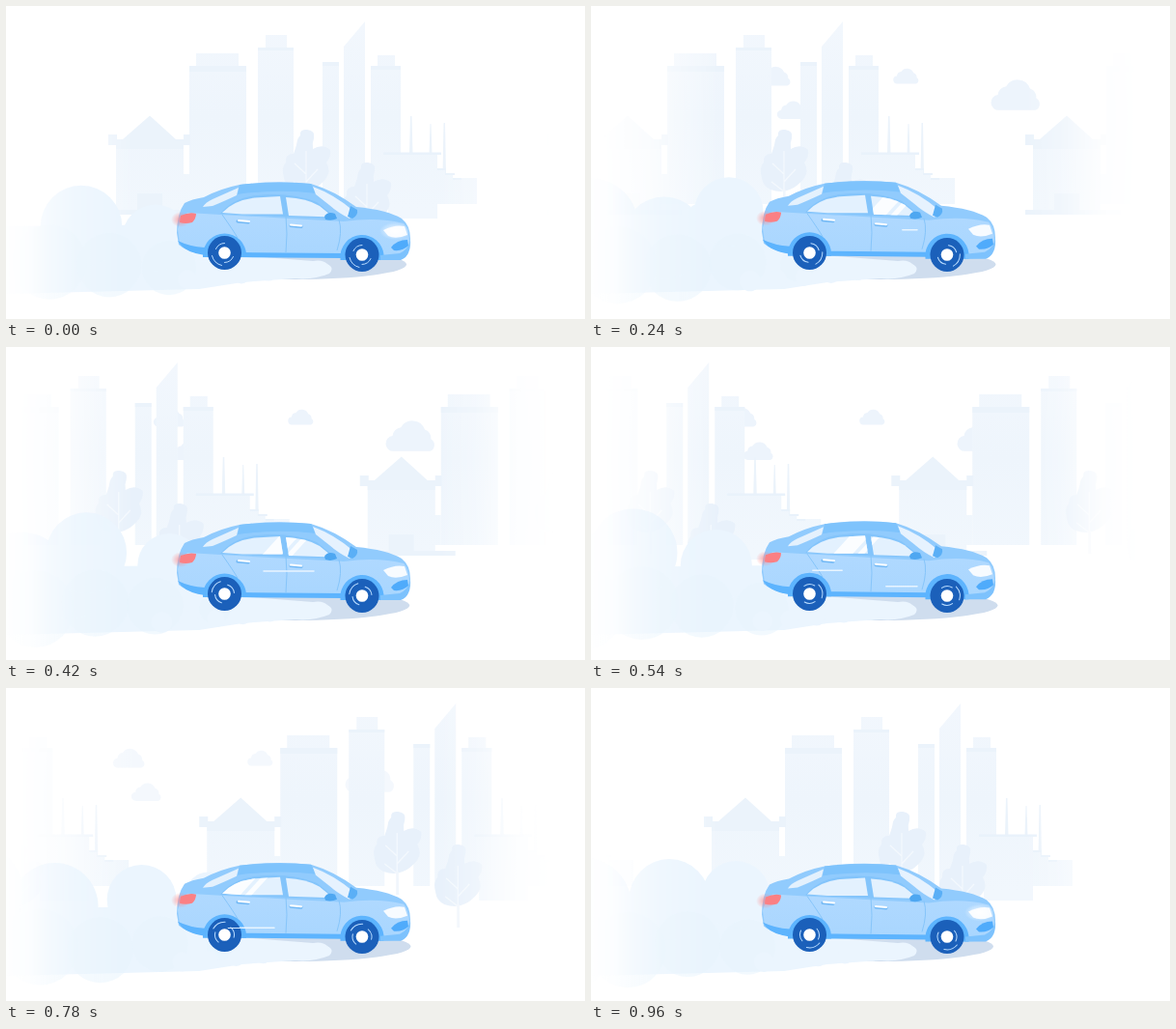
Write an HTML page that moves like this. It is 600 px wide and 324 px high and loops after 1020 ms.

```html
<!DOCTYPE html>
<html lang="en">
<head>
<meta charset="utf-8">
<title>City drive</title>
<style>
  html, body { margin: 0; width: 100%; height: 100%; overflow: hidden; background: #fff; }
  svg { display: block; width: 100vw; height: 100vh; }
</style>
</head>
<body>
<svg viewBox="0 0 600 324">
  <defs>
    <linearGradient id="sides" gradientUnits="userSpaceOnUse" x1="0" x2="600" y1="0" y2="0">
      <stop offset=".02" stop-color="#000"/>
      <stop offset=".1" stop-color="#444"/>
      <stop offset=".15" stop-color="#999"/>
      <stop offset=".22" stop-color="#fff"/>
      <stop offset=".75" stop-color="#fff"/>
      <stop offset=".81" stop-color="#bbb"/>
      <stop offset=".85" stop-color="#666"/>
      <stop offset=".885" stop-color="#222"/>
      <stop offset=".95" stop-color="#000"/>
    </linearGradient>
    <linearGradient id="left" gradientUnits="userSpaceOnUse" x1="0" x2="600" y1="0" y2="0">
      <stop offset="0" stop-color="#080808"/>
      <stop offset=".04" stop-color="#282828"/>
      <stop offset=".07" stop-color="#777"/>
      <stop offset=".12" stop-color="#ccc"/>
      <stop offset=".2" stop-color="#fff"/>
    </linearGradient>
    <mask id="fade" maskUnits="userSpaceOnUse" x="0" y="0" width="600" height="324">
      <rect width="600" height="324" fill="url(#sides)"/>
    </mask>
    <mask id="haze" maskUnits="userSpaceOnUse" x="0" y="0" width="600" height="324">
      <rect width="600" height="324" fill="url(#left)"/>
    </mask>
    <linearGradient id="wall" gradientUnits="userSpaceOnUse" x1="0" x2="0" y1="20" y2="210">
      <stop offset="0" stop-color="#f2f7fd"/>
      <stop offset=".5" stop-color="#eef5fc"/>
      <stop offset="1" stop-color="#f1f7fd"/>
    </linearGradient>
    <radialGradient id="red">
      <stop offset="0" stop-color="#ff8585" stop-opacity=".75"/>
      <stop offset="1" stop-color="#ff8585" stop-opacity="0"/>
    </radialGradient>
    <radialGradient id="white">
      <stop offset="0" stop-color="#fff"/>
      <stop offset="1" stop-color="#fff" stop-opacity="0"/>
    </radialGradient>
    <linearGradient id="paint" x1="0" x2="0" y1="0" y2="1">
      <stop offset="0" stop-color="#b0d9ff"/>
      <stop offset="1" stop-color="#a9d6fe"/>
    </linearGradient>
    <clipPath id="glass">
      <path d="M224 213Q236 200 258 197.500L284 196L287 214.500L245 214.500Z"/>
      <path d="M290 197Q312 198 325 206L339 217.500L293 216Z"/>
    </clipPath>

    <path id="puffy" d="M-17 15a7 7 0 0 1-1-14a9 9 0 0 1 8-8a13 13 0 0 1 23 2a9 9 0 0 1 6 9a6 6 0 0 1-1 11z"/>

    <g id="tree" fill="#e8f1fb">
      <path d="M-10 8Q-9 0-6-2Q-7-9 1-8Q10-7 8 1Q6 6 7 12Q17 6 25 13Q26 20 21 26Q26 35 21 42Q14 51 6 54Q-3 58-14 54Q-22 50-23 42Q-26 31-21 26Q-22 17-13 17Z"/>
      <path d="M0 14V56M0 46l12-13M0 38l-12-11M0 56l-13-10" fill="none" stroke="#f4f9fe" stroke-width="1.200"/>
      <path d="M-1 54h2.500l.5 24h-3z" fill="#f1f6fc"/>
    </g>

    <g id="city" fill="url(#wall)">
      <path d="M190 174h-7v31h7z"/>
      <path d="M197 49h44v14h-44zM190 62h59v143h-59z"/>
      <path d="M269 30h22v14h-22zM261 43h37v162h-37z"/>
      <path d="M328 58h17v147h-17zM350 42L372 16V205H350Z"/>
      <path d="M385 51h18v12h-18zM378 62h31v143h-31z"/>
      <g fill="#ebf3fb">
        <path d="M190 62h59v6h-59zM261 43h37v3h-37zM328 58h17v4h-17zM378 62h31v4h-31z"/>
        <path d="M419 114h1.500l1 39h-3.500zM439.500 122h1l1 31h-3zM453.500 121h1.500l1 54h-3.500z"/>
        <path d="M121 138L149 113.500L176 138Z"/>
        <path d="M106 133h9v5h69v-5h7v11H106z"/>
      </g>
      <path d="M396 153h51v15h8v5h8v5h25v27h-41v15h-51z"/>
      <path d="M391 151.500h60v2.500h-60zM447 168h9v2h-9zM455 173h10v2h-10zM463 178h9v2h-9z" fill="#e9f2fb"/>
      <path d="M114 144h70v69h-70z"/>
      <path d="M114 144h70v4h-70zM136 194h26v18h-26zM106 211h99v5h-99z" fill="#ebf3fb"/>
      <use href="#tree" x="311" y="136"/>
      <use href="#tree" x="374" y="170"/>
    </g>

    <g id="wheel">
      <circle r="17.500" fill="#1b60ba"/>
      <g class="spin" fill="none" stroke="#b9dcff" stroke-width="1" stroke-linecap="round">
        <path d="M-9-4A10 10 0 0 1 0-10M9 4A10 10 0 0 1 0 10M-3 13A13.500 13.500 0 0 1-13 3"/>
      </g>
      <circle r="8" fill="#1b60ba"/>
      <circle r="6.300" fill="#fff"/>
    </g>
  </defs>

  <g mask="url(#fade)">
    <g id="clouds" fill="#edf4fc">
      <use href="#puffy" transform="translate(469 91) scale(1.08 1.12)"/>
      <use href="#puffy" transform="translate(355 72) scale(.56)"/>
      <use href="#puffy" transform="translate(219 72) scale(.7)"/>
      <use href="#puffy" transform="translate(237 107) scale(.66)"/>
    </g>
    <g id="scroll">
      <use href="#city"/>
      <use href="#city" x="455"/>
    </g>
  </g>

  <ellipse id="shadow" cx="300" cy="267.500" ry="15.500" fill="#cfddee"/>

  <g mask="url(#haze)">
    <path d="M0 228L200 226L215 256L318 264Q328 262 333 267Q341 271 335 277Q318 284 300 282L245 286L200 293L0 298Z" fill="#ebf5fe"/>
    <g id="smoke"></g>
  </g>

  <g id="car">
    <path d="M177 234Q177 214 185 203Q192 199 205 197Q222 188 242 184Q280 179 316 183Q340 190 363 207Q395 210 410 219Q419 226 419 240Q419 257 409 261L386 262L345 259L205 256Q185 252 179 246Z" fill="#91cbfd"/>
    <path d="M178 230Q181 218 188 213Q240 216 293 219L350 222Q385 217 412 224Q418 230 418 246Q414 257 405 259L345 257L205 253Q187 250 180 244Z" fill="url(#paint)"/>
    <path d="M242 184Q280 180 316 183L322 193Q280 188 240 194Z" fill="#7ec3fc"/>
    <path d="M204 207Q207 202 214 199L241 187L239 195Q224 202 214 206Z" fill="#e4f1fd"/>
    <path d="M318 186Q340 194 360 211L356 219Q344 213 335 205L321 194Z" fill="#e6f2fe"/>
    <path d="M357 206L364 210Q365 216 359 219L354 217Z" fill="#5aaff6"/>
    <path d="M222 214Q236 197 260 195Q295 191 322 202L343 219L290 217Z" fill="#83c4fb"/>
    <path d="M224 213Q236 200 258 197.500L284 196L287 214.500L245 214.500Z" fill="#e3f1fe"/>
    <path d="M290 197Q312 198 325 206L339 217.500L293 216Z" fill="#e3f1fe"/>
    <g clip-path="url(#glass)">
      <path id="glare" d="M-22 12L0-12H20L-2 12ZM3 12L25-12H32L10 12Z" fill="#fff"/>
    </g>
    <path d="M290 216Q292 235 290 254M224 215Q236 232 240 239M345 220Q349 233 343 252" fill="none" stroke="#86c5fa" stroke-width="1"/>
    <path d="M330 217Q333 211 341 214L343 219Q337 222 331 220Z" fill="#4ea7f1"/>
    <g fill="none" stroke-linecap="round">
      <path d="M240 222l11 1M295 226.500l11 1" stroke="#73b9f5" stroke-width="3"/>
      <path d="M241 221l11 1M295 225.500l11 1" stroke="#fff" stroke-width="2"/>
    </g>
    <g fill="#5db4fe">
      <path d="M178 242Q190 248 206 249V257Q184 254 178 242ZM240 254L350 255V260L240 259Z"/>
      <path d="M204 257A22.500 22.500 0 0 1 249 257V259H204ZM346.500 260A22.500 22.500 0 0 1 391.500 257V262H346.500Z"/>
      <path d="M388 257L408 255Q417 251 419 241Q420 258 409 262H388Z" fill="#7dc2fd"/>
      <path d="M399 249Q405 241 416 241L417 247Q411 253 402 252Z" fill="#4fabfb"/>
    </g>
    <path d="M391 231Q403 225 413 227L416 236Q404 241 396 237Z" fill="#f7fbff"/>
    <ellipse id="lamp" cx="403" cy="232" rx="16" ry="9" fill="url(#white)"/>
    <ellipse cx="181" cy="220" rx="10" ry="8" fill="url(#red)"/>
    <path d="M181 216Q190 212 197 214Q197 219 193 223Q186 225 180 223Z" fill="#fb8084"/>
    <path id="streak1" stroke="#e9f5ff" stroke-width="1.500" stroke-linecap="round"/>
    <path id="streak2" stroke="#e9f5ff" stroke-width="1.500" stroke-linecap="round"/>
  </g>
  <use href="#wheel" transform="translate(226.500 255.500)"/>
  <use href="#wheel" transform="translate(369 257.500)"/>
  <path id="streak3" stroke="#d3e9ff" stroke-width="1.200" stroke-linecap="round"/>
</svg>
<script>
  const LOOP = 1020, STEP = 60, SMOKE_SPEED = 0.33;
  const $ = id => document.getElementById(id);
  const clamp = (v, lo = 0, hi = 1) => Math.max(lo, Math.min(hi, v));
  const move = (el, x, y) => el.setAttribute('transform', `translate(${x} ${y})`);
  const spin = document.querySelector('.spin');

  const addCircle = (fill, alpha) => {
    const c = document.createElementNS('http://www.w3.org/2000/svg', 'circle');
    c.setAttribute('fill', fill);
    c.setAttribute('opacity', alpha);
    return $('smoke').appendChild(c);
  };
  const place = (c, x, y, r) => {
    c.setAttribute('cx', x);
    c.setAttribute('cy', y);
    c.setAttribute('r', r);
  };

  // Starting x and centre y of the tall puffs, then an even row along the ground.
  const puffs = [[78, 228], [155, 240], [205, 238], [222, 213], [308, 226], [398, 219], [467, 214]]
    .map(([x, y]) => ({ x, y, size: 1, el: addCircle('#ebf5fe', 1) }));
  for (let k = 0; k < 8; k++) {
    puffs.push({ x: 45 + 62 * k, y: 265 + (k % 3) * 3, size: 0.85, el: addCircle('#e8f4fe', 0.55) });
  }
  const bumps = Array.from({ length: 6 }, () => addCircle('#ebf5fe', 1));

  function streak(el, from, to, y) {
    el.setAttribute('d', to - from > 1 ? `M${from} ${y}H${to}` : '');
  }

  function draw(t) {
    const bob = Math.cos(t / 340 * 2 * Math.PI);
    move($('scroll'), -0.4625 * t, 0);
    move($('clouds'), -0.1167 * t, 0);
    $('clouds').setAttribute('opacity', Math.min(clamp(t / 240), clamp((960 - t) / 300)));
    move($('car'), 0, bob);
    $('shadow').setAttribute('rx', 118.500 - 3.500 * bob);
    spin.setAttribute('transform', `rotate(${t / LOOP * 1080})`);
    $('lamp').setAttribute('opacity', t < 60 || t > 900 ? 0.9 : 0);

    // Puffs swell as they drift away behind the car.
    for (const p of puffs) {
      const x = p.x - SMOKE_SPEED * t;
      place(p.el, x, p.y, p.size * (50 - 0.1 * x) * clamp((250 - x) / 50));
    }
    bumps.forEach((c, k) => {
      const d = 28 * k - (SMOKE_SPEED * t) % 28;
      place(c, 188 + d, 283 - 0.07 * d, 10 - 0.03 * d);
    });

    $('glare').setAttribute('opacity', t > 30 && t < 930 ? 0.85 : 0);
    move($('glare'), 328 - 0.12 * (t - 60), 206);

    const head = 267 - 0.31 * (t - 420);
    const tail = 319 - 0.49 * (t - 420);
    streak($('streak1'), head, Math.min(tail, 338), 232);
    const low = 268 - 0.315 * (t - 660);
    const end = t < 780 ? 317 - 0.33 * (t - 660) : 278 - 0.5 * (t - 780);
    streak($('streak2'), Math.max(low, 215), Math.min(end, 338), 248.5);
    streak($('streak3'), Math.max(low, 215), Math.min(end, 244), 248.5);
  }

  function frame() {
    draw(Math.floor(performance.now() % LOOP / STEP) * STEP);
    requestAnimationFrame(frame);
  }
  frame();
</script>
</body>
</html>
```
